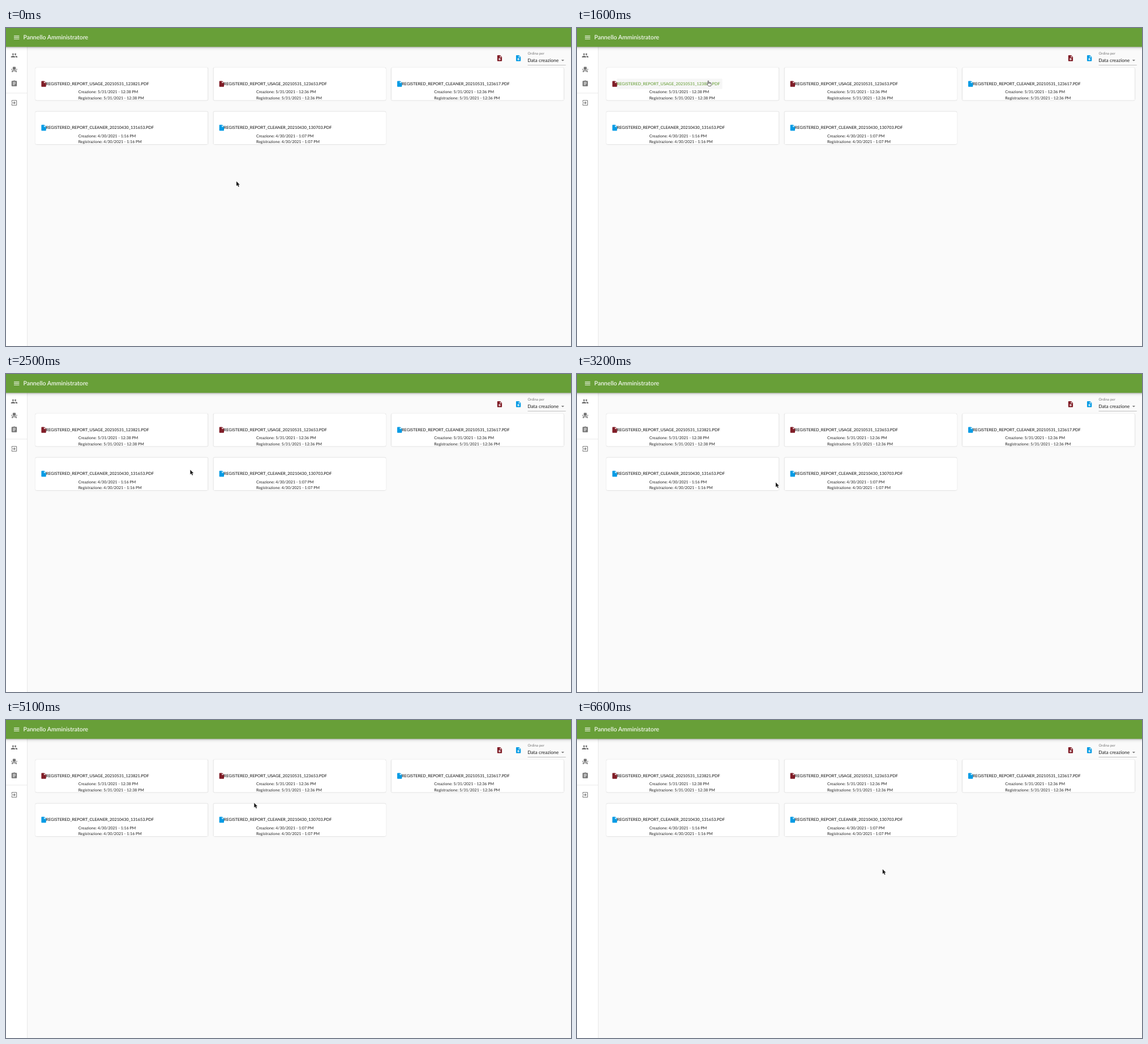
Animation of 998x561 px, one loop 8 s. Source, as an HTML page:

```html
<!DOCTYPE html>
<html lang="it">
<head>
<meta charset="utf-8">
<title>Pannello Amministratore</title>
<style>
  html, body { margin: 0; width: 100%; height: 100%; overflow: hidden; background: #fafafa; }
  svg { display: block; width: 100%; height: 100%; }
  text { font-family: Lato, sans-serif; text-rendering: geometricPrecision; white-space: pre; }
  .card { fill: #fff; filter: drop-shadow(0 .6px .3px rgba(0,0,0,.32)) drop-shadow(0 .4px .8px rgba(0,0,0,.09)); }
  .bar { fill: #689f38; filter: drop-shadow(0 1.2px 1.2px rgba(0,0,0,.2)) drop-shadow(0 2px 2.6px rgba(0,0,0,.14)); }
  .title { font-size: 10.6px; font-weight: 500; fill: #fff; }
  .file { font-size: 7.28px; font-weight: 500; fill: #212121; }
  .date { font-size: 7px; fill: #212121; }
  .label { font-size: 6.28px; fill: #757575; }
  .value { font-size: 8.42px; fill: #212121; }
</style>
</head>
<body>
<svg id="stage" viewBox="0 0 998 561" xmlns="http://www.w3.org/2000/svg"></svg>
<script>
const LOOP = 8000, STEP = 100;
const GREEN = '#689f38', MAROON = '#801d27', BLUE = '#039be5', GREY = '#757575', INK = '#212121';
const stage = document.getElementById('stage');

function add(tag, attrs, parent = stage, content) {
  const el = document.createElementNS('http://www.w3.org/2000/svg', tag);
  for (const k in attrs) el.setAttribute(k, attrs[k]);
  if (content) el.textContent = content;
  parent.appendChild(el);
  return el;
}
const rect = (x, y, width, height, attrs) => add('rect', { x, y, width, height, ...attrs });
const label = (x, y, cls, str) => add('text', { x, y, class: cls }, stage, str);

// 24-unit icons, drawn around a centre point
const icons = {
  menu: 'M3 18h18v-2H3v2zm0-5h18v-2H3v2zm0-7v2h18V6H3z',
  people: 'M16 11c1.66 0 3-1.34 3-3s-1.34-3-3-3-3 1.34-3 3 1.34 3 3 3zm-8 0c1.66 0 3-1.34 3-3S9.66 5 8 5 5 6.34 5 8s1.34 3 3 3zm0 2c-2.33 0-7 1.17-7 3.5V19h14v-2.5c0-2.33-4.67-3.5-7-3.5zm8 0c-.29 0-.62.02-.97.05 1.16.84 1.97 1.97 1.97 3.45V19h6v-2.5c0-2.33-4.67-3.5-7-3.5z',
  seat: 'M4 18v3h3v-3h10v3h3v-6H4zm15-8h3v3h-3zM2 10h3v3H2zm15 3H7V5c0-1.1.9-2 2-2h6c1.1 0 2 .9 2 2v8z',
  clipboard: 'M19 3h-4.18C14.4 1.84 13.3 1 12 1s-2.4.84-2.82 2H5c-1.1 0-2 .9-2 2v14c0 1.1.9 2 2 2h14c1.1 0 2-.9 2-2V5c0-1.1-.9-2-2-2zm-7 0c.55 0 1 .45 1 1s-.45 1-1 1-1-.45-1-1 .45-1 1-1zm2 14H7v-2h7v2zm3-4H7v-2h10v2zm0-4H7V7h10v2z',
  exit: 'M10.09 15.59L11.5 17l5-5-5-5-1.41 1.41L12.67 11H3v2h9.67l-2.58 2.59zM19 3H5c-1.1 0-2 .9-2 2v4h2V5h14v14H5v-4H3v4c0 1.1.9 2 2 2h14c1.1 0 2-.9 2-2V5c0-1.1-.9-2-2-2z',
  file: 'M6 2c-1.1 0-2 .9-2 2v16c0 1.1.9 2 2 2h12c1.1 0 2-.9 2-2V8l-6-6H6zm7 7V3.5L18.5 9H13z',
  fileAdd: 'M14 2H6c-1.1 0-2 .9-2 2v16c0 1.1.9 2 2 2h12c1.1 0 2-.9 2-2V8l-6-6zm2 14h-3v3h-2v-3H8v-2h3v-3h2v3h3v2zm-3-7V3.5L18.5 9H13z'
};
const icon = (name, cx, cy, fill) =>
  add('path', { d: icons[name], fill, transform: `translate(${cx} ${cy}) scale(.52) translate(-12 -12)` });

// Side navigation
rect(0, 33, 37.3, 528, { fill: '#fff' });
rect(37.3, 33, .6, 528, { fill: '#dcdcdc' });
rect(0, 114.6, 37.3, .6, { fill: '#dcdcdc' });
icon('people', 14.5, 48.4, GREY);
icon('seat', 14.5, 73.2, GREY);
icon('clipboard', 14.5, 98, GREY);
icon('exit', 14.5, 132, GREY);

// Header
rect(-9, -9, 1016, 42.3, { class: 'bar' });
icon('menu', 18.7, 16.6, '#fff');
label(30.4, 19.9, 'title', 'Pannello Amministratore');

// Actions and sort menu
icon('fileAdd', 871.9, 53.3, MAROON);
icon('fileAdd', 905.1, 53.3, BLUE);
label(921.4, 46.9, 'label', 'Ordina per');
label(921.2, 60, 'value', 'Data creazione');
add('path', { d: 'M980.8 56h5.2l-2.6 2.6z', fill: GREY });
rect(921.5, 65, 67.3, .55, { fill: '#949494' });

// Report cards
const reports = [
  ['USAGE', '20210531_123821', '5/31/2021 - 12:38 PM'],
  ['USAGE', '20210531_123653', '5/31/2021 - 12:36 PM'],
  ['CLEANER', '20210531_123617', '5/31/2021 - 12:36 PM'],
  ['CLEANER', '20210430_131653', '4/30/2021 - 1:16 PM'],
  ['CLEANER', '20210430_130703', '4/30/2021 - 1:07 PM']
];
const button = { x: 70.3, y: 89.2, w: 186.4, h: 18.6 };
let overlay;
const names = reports.map(([kind, stamp, date], i) => {
  const x = 52 + (i % 3) * 314.3, y = 69.9 + Math.floor(i / 3) * 77.4;
  rect(x, y, 304.7, 57.9, { rx: 2, class: 'card' });
  if (!i) overlay = rect(button.x, button.y, button.w, button.h, { rx: 2 });
  icon('file', x + 14.6, y + 28.7, kind === 'USAGE' ? MAROON : BLUE);
  const name = label(x + 18.4, y + 30.9, 'file', `REGISTERED_REPORT_${kind}_${stamp}.PDF`);
  label(x + 75.7, y + 45.5, 'date', 'Creazione: ' + date);
  label(x + 75.7, y + 55.9, 'date', 'Registrazione: ' + date);
  return name;
});

// Pointers, hotspot at 0,0
const arrow = add('path', {
  d: 'M0 0V8.3l1.9-1.7 1.5 3.2 1.4-.7-1.5-3H5.9z',
  fill: '#1c1c1c', stroke: '#fff', 'stroke-width': .6, 'paint-order': 'stroke'
});
const hand = add('g', { stroke: '#222', 'stroke-width': .65, 'stroke-linejoin': 'round', 'stroke-linecap': 'round' });
add('path', {
  d: 'M-.4 .7C-.4-.2 1.2-.2 1.2 .7V3.4C1.5 2.9 2.7 3 2.8 3.7 3.2 3.2 4.3 3.4 4.4 4.1 4.9 3.7 5.8 4 5.8 4.9V6.8C5.8 8 5 8.4 5 9.5H.8C.8 8.4-2 7-2.2 5.7-2.2 4.8-1.1 4.9-.4 6z',
  fill: '#fff'
}, hand);
add('path', { d: 'M1.2 3.4V5M2.8 3.7V5.2M4.4 4.1V5.3', fill: 'none' }, hand);

// Pointer moves: first step, last step, end point
const start = [407, 270.4];
const moves = [
  [500, 700, 279, 159.8],
  [1100, 1400, 231.4, 92.9],
  [2200, 2600, 336.3, 177.8],
  [2700, 2900, 351, 190.4],
  [3100, 3200, 351, 191.2],
  [3700, 4000, 409.1, 194.6],
  [4300, 4500, 424.7, 225],
  [4900, 5100, 438.3, 146.2],
  [5300, 5400, 439.8, 136.6],
  [6100, 6600, 539.8, 263.2]
];
const clamp = v => Math.max(0, Math.min(1, v));
const ramp = (t, from, to) => clamp((t - from) / (to - from));
const smooth = u => u * u * (3 - 2 * u);

function pointerAt(t) {
  let [x, y] = start;
  for (const [first, last, ex, ey] of moves) {
    const u = smooth(ramp(t, first - STEP, last));
    x += (ex - x) * u;
    y += (ey - y) * u;
  }
  return [x, y];
}

function draw(ms) {
  const t = Math.floor(ms / STEP) * STEP;
  const [x, y] = pointerAt(t);
  const over = x > button.x && x < button.x + button.w && y > button.y && y < button.y + button.h;
  const pos = `translate(${x} ${y})`;
  arrow.setAttribute('transform', pos);
  hand.setAttribute('transform', pos);
  arrow.setAttribute('visibility', over ? 'hidden' : 'visible');
  hand.setAttribute('visibility', over ? 'visible' : 'hidden');

  const hover = ramp(t, 1300, 1600), press = ramp(t, 1700, 2100), leave = ramp(t, 2200, 2500);
  overlay.setAttribute('fill', press ? '#5f7f38' : '#555');
  overlay.setAttribute('fill-opacity', (.05 * hover + .1 * press) * (1 - leave));
  names[0].style.fill = over ? GREEN : INK;
}

const t0 = performance.now();
(function tick() {
  draw((performance.now() - t0) % LOOP);
  requestAnimationFrame(tick);
})();
</script>
</body>
</html>
```
